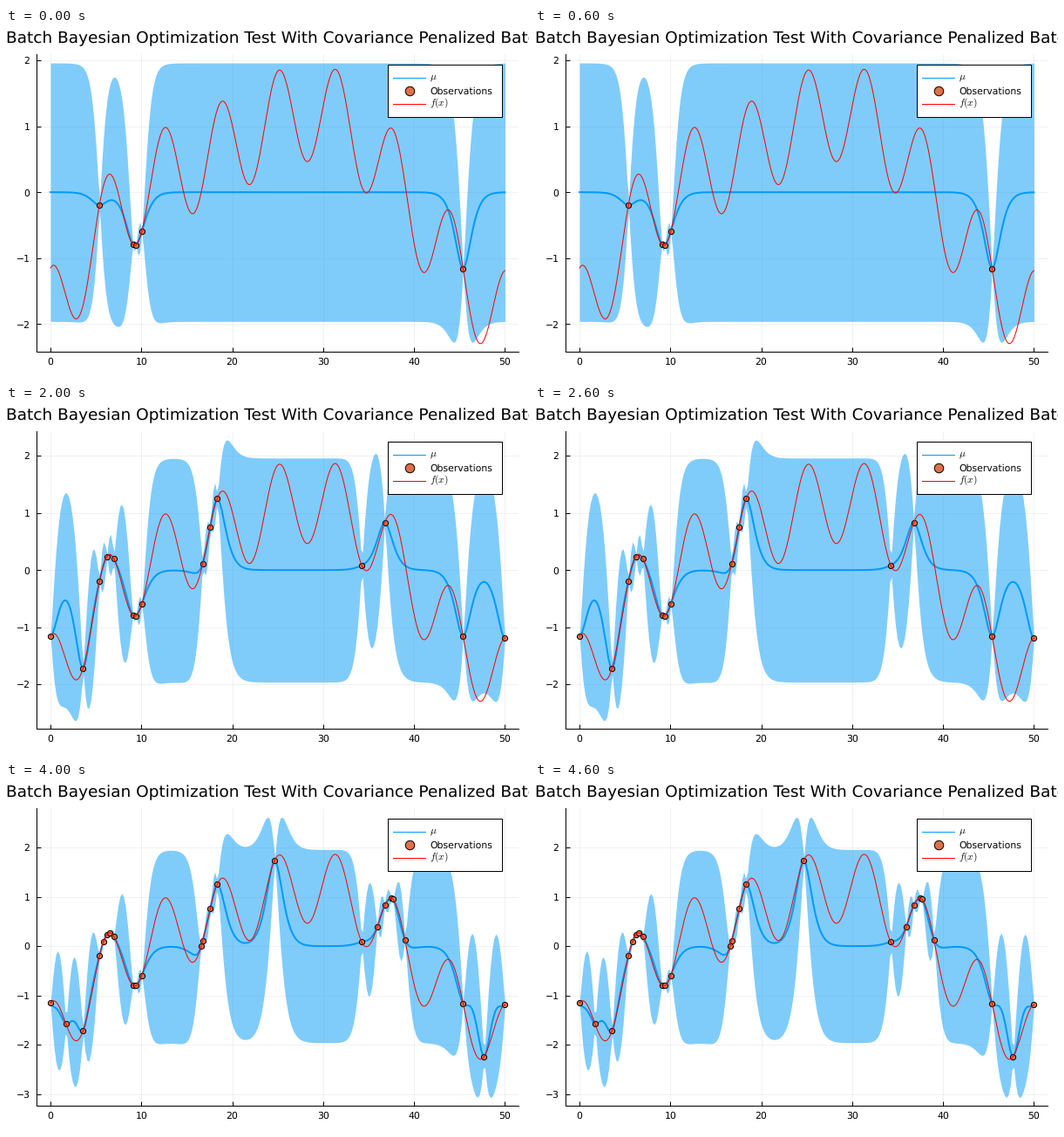
These frames come from a looping animation (600x400 px, 5 s). A matplotlib script:

```python
import numpy as np
import matplotlib.pyplot as plt
from matplotlib.animation import FuncAnimation
from matplotlib.patches import Rectangle
from matplotlib.ticker import MultipleLocator

W, H = 600, 400
LEFT, RIGHT, TOP, BOTTOM = 35.4, 588, 30.4, 371.4
PX = 0.72  # points per pixel at 100 dpi
MARGIN = 0.03
BLUE, ORANGE, RED = "#009af9", "#e26f46", "red"

plt.rcParams.update({
    "font.family": "DejaVu Sans",
    "mathtext.fontset": "cm",
    "text.hinting": "none",
})

# Points sampled by each batch of the optimizer
BATCHES = [
    [5.38, 9.08, 9.4, 10.05, 45.4],
    [0, 6.95, 17.57, 34.25, 50],
    [3.57, 6.2, 16.75, 18.35, 36.78],
    [5.83, 6.53, 24.67, 35.95, 37.65],
    [1.7, 16.6, 37.5, 39, 47.7],
]


def objective(x):
    x = np.asarray(x, float)
    return 3 * np.sin(0.0628 * x) + np.sin(x / 4) / 4 + 0.75 * np.cos(x) - 1.9


def matern(a, b):
    s = np.sqrt(5) * np.abs(np.subtract.outer(a, b))
    return (1 + s + s**2 / 3) * np.exp(-s)


def posterior(x, obs):
    """Mean and half width of the 95 % band of a Matern 5/2 process."""
    cross = matern(x, obs)
    gain = np.linalg.solve(matern(obs, obs) + 1e-9 * np.eye(len(obs)), cross.T)
    mean = gain.T @ objective(obs)
    var = 1 - np.sum(cross.T * gain, axis=0)
    return mean, 1.96 * np.sqrt(np.maximum(var, 0))


def padded(low, high):
    pad = MARGIN * (high - low)
    return low - pad, high + pad


grid = np.linspace(0, 50, 250)
fine = np.linspace(0, 50, 1001)
truth = objective(fine)

fig = plt.figure(figsize=(W / 100, H / 100), dpi=100, facecolor="white")
ax = fig.add_axes([LEFT / W, 1 - BOTTOM / H, (RIGHT - LEFT) / W, (BOTTOM - TOP) / H])
ax.set_xlim(padded(0, 50))
ax.xaxis.set_major_locator(MultipleLocator(10))
ax.yaxis.set_major_locator(MultipleLocator(1))
ax.spines[["top", "right"]].set_visible(False)
ax.spines[["left", "bottom"]].set_linewidth(PX)
ax.tick_params(direction="in", length=5 * PX, width=PX, labelsize=10.9 * PX)
ax.tick_params(axis="x", pad=6.5 * PX)
ax.tick_params(axis="y", pad=8 * PX)
ax.set_axisbelow(True)
ax.grid(color="black", alpha=0.08, linewidth=0.7 * PX)

mean_line, = ax.plot([], [], color=BLUE, lw=2 * PX, zorder=3)
dots, = ax.plot([], [], "o", ms=6.2 * PX, mfc=ORANGE, mec="black", mew=PX,
                zorder=4, clip_on=False)
ax.plot(fine, truth, color=RED, lw=PX, zorder=5)
band = []

# Overlay in pixel coordinates for the title and legend
top = fig.add_axes([0, 0, 1, 1], facecolor="none")
top.set(xlim=(0, W), ylim=(H, 0))
top.axis("off")
top.text(0.5, 17.5, "Batch Bayesian Optimization Test With Covariance Penalized Batch",
         fontsize=18.45 * PX, va="baseline")
top.add_patch(Rectangle((437.6, 41.6), 131, 60, fc="white", ec="black", lw=PX))
for y, color, label in [(56.6, BLUE, r"$\mu$"), (87.2, RED, r"$f(x)$")]:
    top.plot([443.6, 480.6], [y, y], color=color, lw=PX)
    top.text(486.5, y + 2, label, fontsize=11.4 * PX, va="baseline")
top.plot(462.5, 71.9, "o", ms=10.5 * PX, mfc=ORANGE, mec="black", mew=PX)
top.text(486.3, 76.3, "Observations", fontsize=10.9 * PX, va="baseline")


def draw(i):
    obs = np.sort(np.concatenate(BATCHES[:i + 1]))
    mean, half = posterior(grid, obs)
    low, high = mean - half, mean + half
    while band:
        band.pop().remove()
    band.append(ax.fill_between(grid, low, high, color=BLUE, alpha=0.5, lw=0, zorder=2))
    mean_line.set_data(grid, mean)
    dots.set_data(obs, objective(obs))
    ax.set_ylim(padded(min(low.min(), truth.min()), max(high.max(), truth.max())))
    return mean_line, dots


anim = FuncAnimation(fig, draw, frames=len(BATCHES), init_func=lambda: draw(0),
                     interval=1000, repeat=True, repeat_delay=0, blit=False)
plt.show()
```
